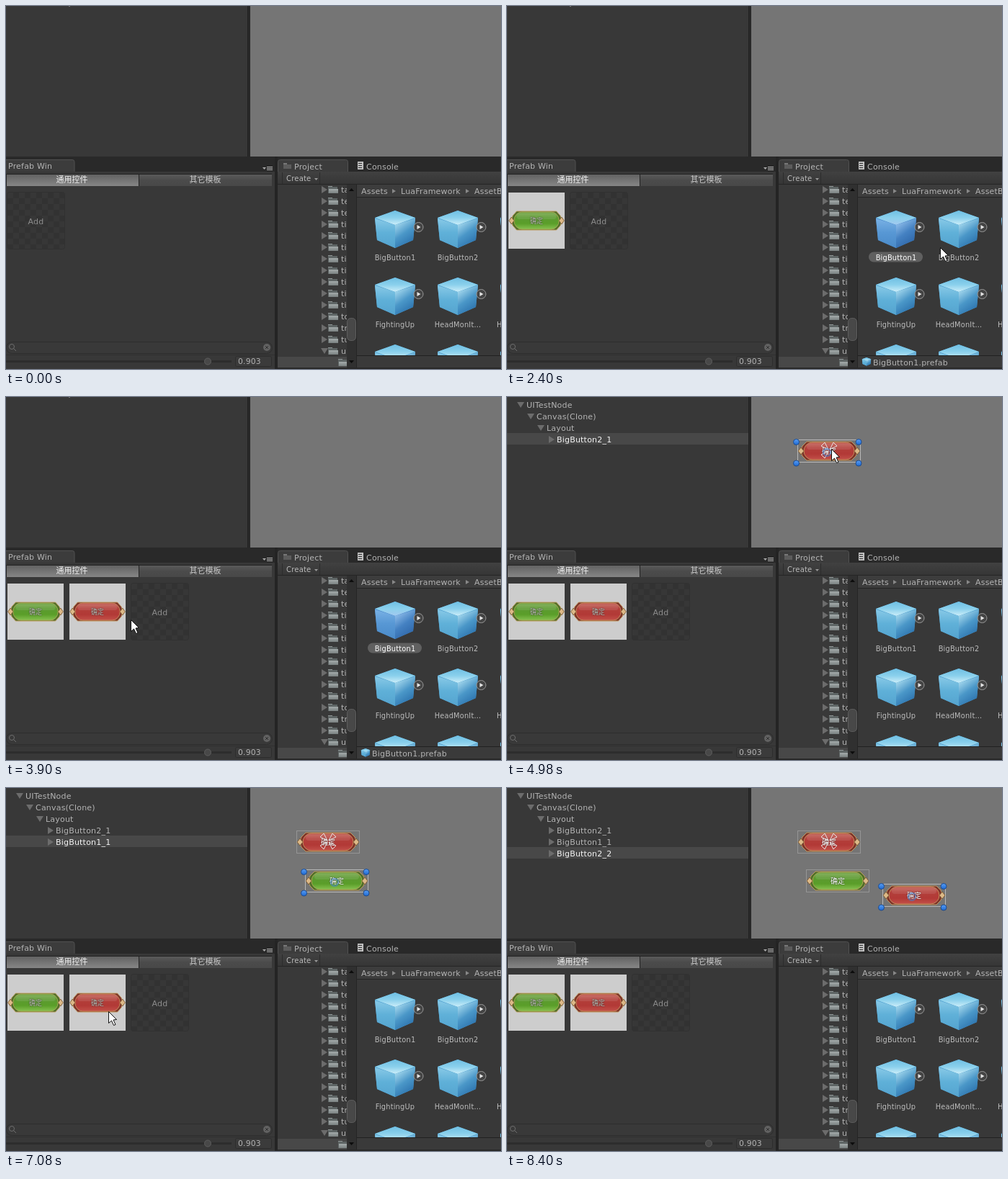
These frames come from a looping animation (687 px wide and 504 px high, 8.88 s). An HTML page with a canvas:

```html
<!DOCTYPE html>
<html lang="zh">
<head>
<meta charset="utf-8">
<style>
html, body { margin: 0; width: 100%; height: 100%; overflow: hidden; background: #292929; }
canvas { display: block; }
</style>
</head>
<body>
<canvas id="stage" width="687" height="504"></canvas>
<script>
const c = document.getElementById('stage').getContext('2d');
const LOOP = 8880, STEP = 60;
const SANS = '"DejaVu Sans", Verdana, sans-serif';
const CJK = '"Noto Sans CJK SC", "Noto Sans CJK", sans-serif';

// Pointer path: time, x, y
const path = [
  [60, 629, 170], [480, 534, 319], [1500, 534, 319], [1560, 497, 319],
  [1980, 44, 303], [2040, 44, 303], [2400, 601, 335], [2640, 630, 322],
  [2760, 630, 322], [3300, 276, 304], [3480, 238, 308], [3780, 238, 308],
  [3900, 173, 309], [4140, 121, 300], [4380, 121, 300], [4860, 450, 72],
  [5220, 450, 72], [5580, 20, 300], [5700, 12, 298], [6060, 383, 190],
  [6300, 470, 127], [6480, 470, 127], [7080, 142, 310], [7260, 142, 310],
  [8040, 563, 143], [8160, 563, 143], [8400, 690, 96]
];

function rect(x, y, w, h, fill) {
  c.fillStyle = fill;
  c.fillRect(x, y, w, h);
}
function line(x, y, w, h, color) {
  c.strokeStyle = color;
  c.lineWidth = 1;
  c.strokeRect(x + .5, y + .5, w - 1, h - 1);
}
function round(x, y, w, h, r, fill, stroke) {
  c.beginPath();
  c.roundRect(x, y, w, h, r);
  paint(fill, stroke);
}
function circle(x, y, r, fill, stroke) {
  c.beginPath();
  c.arc(x, y, r, 0, 7);
  paint(fill, stroke);
}
function poly(points, fill, stroke) {
  c.beginPath();
  for (let i = 0; i < points.length; i += 2) c.lineTo(points[i], points[i + 1]);
  c.closePath();
  paint(fill, stroke);
}
function paint(fill, stroke) {
  if (fill) { c.fillStyle = fill; c.fill(); }
  if (stroke) { c.strokeStyle = stroke; c.lineWidth = 1; c.stroke(); }
}
function grad(x0, y0, x1, y1, ...colors) {
  const g = c.createLinearGradient(x0, y0, x1, y1);
  colors.forEach((color, i) => g.addColorStop(i / (colors.length - 1), color));
  return g;
}
function text(str, x, y, color = '#b4b4b4', size = 11, align = 'left', family = SANS) {
  c.font = `${size}px ${family}`;
  c.letterSpacing = family === SANS ? '.2px' : '0px';
  c.textAlign = align;
  c.textBaseline = 'alphabetic';
  c.fillStyle = color;
  c.fillText(str, x, y + 4);
}
function clipped(x, y, w, h, draw) {
  c.save();
  c.beginPath();
  c.rect(x, y, w, h);
  c.clip();
  draw();
  c.restore();
}
function arrow(x, y, open, color = '#6c6c6c') {
  if (open) poly([x - 5, y - 4, x + 5, y - 4, x, y + 4], color);
  else poly([x - 4, y - 5, x + 4, y, x - 4, y + 5], color);
}
function folder(x, y) {
  rect(x, y - 5, 6, 3, '#8f9696');
  rect(x, y - 4, 13, 9, '#5e6565');
  rect(x + 1, y - 1, 13, 6, grad(0, y - 1, 0, y + 5, '#a4abab', '#7a8181'));
}

function cube(x, y, k, sel) {
  c.save();
  c.translate(x, y);
  c.scale(k, k);
  poly([0, 0, 28, 10, 28, 12, 25, 41, 0, 52, -25, 41, -28, 12, -28, 10], sel ? '#4284c6' : '#4c9dcd');
  poly([0, 0, 28, 10, 0, 20, -28, 10],
    grad(0, 0, 0, 20, '#6fbfe3', '#8ad0ec', sel ? '#a3c9f0' : '#cdeef9'));
  poly([-28, 11, 0, 20, 0, 52, -25, 41],
    sel ? grad(0, 12, 0, 50, '#78b0e4', '#5797d4', '#4c8cca') : grad(0, 12, 0, 50, '#86c8e6', '#5fb0d8', '#56a5d0'));
  poly([28, 11, 0, 20, 0, 52, 25, 41],
    sel ? grad(2, 18, 22, 46, '#8bbae8', '#4481c2', '#3068aa') : grad(2, 18, 22, 46, '#a2d6ec', '#4a97c8', '#2d73ae'));
  c.restore();
}

function asset(x, y, label, sel, pill) {
  cube(x, y, 1, sel);
  circle(x + 32.5, y + 23, 6.5, '#444', '#999');
  poly([x + 30.5, y + 20, x + 35.5, y + 23, x + 30.5, y + 26], '#e4e4e4');
  if (pill) round(x - 38, y + 57.5, 75, 14, 7, pill);
  text(label, x, y + 64.5, pill ? '#fff' : '#bcbcbc', 9.8, 'center');
}

function addCell(x) {
  round(x + .5, 258.5, 80, 79, 3, '#373737', '#313131');
  clipped(x + 1, 259, 79, 78, () => {
    for (let i = 0; i < 10; i++)
      for (let j = 0; j < 10; j++)
        if ((i + j) % 2) rect(x + 1 + i * 8, 259 + j * 8, 8, 8, '#323232');
  });
  text('Add', x + 40.5, 299, '#8e8e8e', 11, 'center');
}

function gameButton(x, y, red, kx = 1, ky = 1, label = '#fff') {
  c.save();
  c.translate(x, y);
  c.scale(kx, ky);
  const frame = [-40, 0, -37, -7, -31, -13, 31, -13, 37, -7, 40, 0, 37, 7, 31, 13, -31, 13, -37, 7];
  poly(frame, red ? '#7c322a' : '#4f6f2a', '#c09a5e');
  for (const s of [-1, 1])
    poly([s * 43, 0, s * 39, -5, s * 35, 0, s * 39, 5], '#dcb988', '#7d5c36');
  round(-35, -12, 70, 24, 12,
    red ? grad(0, -12, 0, 12, '#c4645b', '#b33f3a', '#b23936', '#c25049')
        : grad(0, -12, 0, 12, '#7aa94f', '#5c9a30', '#5a9e29', '#86c150'),
    red ? '#c58a58' : '#a9a552');
  round(-31, -10, 62, 8, 5, '#ffffff18');
  c.shadowColor = '#222';
  c.shadowBlur = 2;
  text('确定', 0, 0, label, 10, 'center', CJK);
  c.restore();
}

function thumb(x, red) {
  rect(x, 259, 78, 78, '#cdcdcd');
  gameButton(x + 39, 298, red, .89, 1, '#b4b4ac');
}

function sceneButton(x, y, red, sel, anchors) {
  gameButton(x, y, red);
  line(x - 44, y - 16, 88, 32, sel ? '#b8b8b8' : '#959595');
  if (anchors)
    for (const sx of [-1, 1])
      for (const sy of [-1, 1])
        poly([x + sx, y - 1 + sy, x + sx * 11, y - 1 + sy * 6, x + sx * 6, y - 1 + sy * 11], null, '#e4e4e4');
  if (!sel) return;
  c.beginPath();
  c.arc(x - 3, y + 2, 5, 0, 7);
  c.strokeStyle = '#3d7fd188';
  c.lineWidth = 2.5;
  c.stroke();
  for (const dx of [-45.5, 41])
    for (const dy of [-12.5, 17])
      circle(x + dx, y + dy, 4, grad(0, y + dy - 4, 0, y + dy + 4, '#5a9ff5', '#1c68d2'), '#1d4a8c');
}

function hierarchy(t) {
  if (t < 4920) { rect(87, 0, 2, 1, '#777'); return; }
  const sel = t < 6480 ? 3 : t < 8100 ? 4 : t < 8160 ? -1 : 5;
  const names = ['UITestNode', 'Canvas(Clone)', 'Layout', 'BigButton2_1'];
  if (t >= 6480) names.push('BigButton1_1');
  if (t >= 8160) names.push('BigButton2_2');
  names.forEach((name, i) => {
    const y = 11 + 16 * i, depth = Math.min(i, 3);
    if (i === sel) rect(0, y - 9, 335, 16, '#484848');
    arrow(19 + 14 * depth + (depth > 2 ? 1 : 0), y, depth < 3);
    text(name, 27 + 14 * depth, y, i === sel ? '#f4f4f4' : '#b4b4b4');
  });
}

function scene(t) {
  rect(339, 0, 348, 209, '#757575');
  if (t >= 4920) sceneButton(447, 75, true, t < 6480, true);
  if (t >= 6480) sceneButton(459, 129, false, t < 8100);
  if (t >= 8100) sceneButton(565, 149, true, true);
}

function prefabPanel(t) {
  round(-4, 213.5, 99, 24, 3, '#3c3c3c', '#515151');
  rect(0, 230, 374, 274, '#383838');
  text('Prefab Win', 3, 222);
  poly([356, 224, 361, 224, 358.5, 227], '#aaa');
  for (const y of [223, 225, 227]) rect(362, y, 8, 1, '#aaa');

  rect(0, 233, 369, 17, '#222');
  rect(1, 234, 183, 16, grad(0, 234, 0, 250, '#626262', '#747474', '#868686'));
  rect(185, 234, 184, 16, grad(0, 234, 0, 250, '#5a5a5a', '#4b4b4b', '#484848'));
  text('通用控件', 91.5, 241, '#f2f2f2', 11, 'center', CJK);
  text('其它模板', 276.5, 241, '#c8c8c8', 11, 'center', CJK);

  const count = (t >= 2040) + (t >= 3480);
  for (let i = 0; i < count; i++) thumb(2 + 86 * i, i === 1);
  addCell(1 + 86 * count);

  round(.5, 466.5, 369, 16, 8, '#393939', '#2d2d2d');
  circle(8, 473, 3.5, null, '#6e6e6e');
  poly([10.5, 475.5, 14, 479], null, '#6e6e6e');
  circle(362, 474, 5, '#626262');
  poly([360, 472, 364, 476], null, '#303030');
  poly([364, 472, 360, 476], null, '#303030');
  rect(0, 484, 374, 1, '#303030');
  rect(0, 492, 313, 3, '#2d2d2d');
  circle(280, 493.5, 4.5, '#484848', '#5e5e5e');
  round(318.5, 486.5, 50, 14, 2, '#3b3b3b', '#2d2d2d');
  text('0.903', 322, 493, '#b4b4b4', 10.8);
}

function tree() {
  rect(377, 248, 96, 254, '#393939');
  clipped(377, 248, 96, 254, () => {
    'ta te te ti ti ti ti ti ti ti ti to tr tu u'.split(' ').forEach((name, i) => {
      const y = 255 + 16 * i;
      arrow(442, y, name === 'u');
      folder(447, y);
      text(name, 465, y);
    });
    rect(377, 487, 96, 16, '#484848');
    folder(461, 495);
  });
  rect(473, 248, 13, 254, '#303030');
  poly([476, 257, 483, 257, 479.5, 253], '#0c0c0c');
  poly([476, 492, 483, 492, 479.5, 496], '#0c0c0c');
  round(473.5, 433.5, 12, 31, 5, '#484848', '#5e5e5e');
}

function projectPanel(t) {
  round(377.5, 213.5, 97, 24, 3, '#3c3c3c', '#515151');
  rect(377, 230, 310, 18, grad(0, 230, 0, 248, '#414141', '#353535'));
  rect(377, 247, 310, 1, '#252525');
  rect(385, 218, 5, 2, '#777');
  rect(385, 220, 11, 6, '#5c5c5c');
  text('Project', 400, 223);
  rect(488, 216, 8, 11, '#c0c0c0');
  for (const y of [218, 221, 224]) rect(489, y, 5, 1, '#333');
  text('Console', 500, 223);
  rect(383, 231, 1, 16, '#2c2c2c');
  rect(435, 231, 1, 16, '#2c2c2c');
  text('Create', 389, 239, '#bbb', 10);
  poly([428, 239, 433, 239, 430.5, 242], '#999');
  tree();

  rect(486, 248, 201, 254, '#383838');
  rect(487, 248, 200, 17, '#3d3d3d');
  rect(487, 265, 200, 1, '#252525');
  rect(486, 248, 1, 254, '#252525');
  text('Assets', 493, 257);
  text('LuaFramework', 548, 257);
  text('AssetBundle', 650, 257);
  for (const x of [538, 640]) poly([x - 2, 254, x + 3, 257, x - 2, 260], '#888');

  const picked = t >= 900 && t < 4920, second = t >= 2700 && t < 3240;
  const first = picked && !second;
  clipped(487, 266, 200, 219, () => {
    asset(540, 284, 'BigButton1', first, first && (t < 2040 ? '#3d6095' : '#606060'));
    asset(627, 284, 'BigButton2', second, second && '#3d6095');
    asset(540, 377, 'FightingUp');
    asset(627, 377, 'HeadMonIt...');
    for (const x of [540, 627, 714]) cube(x, 470, 1);
    cube(714, 284, 1);
    cube(714, 377, 1);
    text('H', 681, 441.5, '#bcbcbc', 9.8);
  });
  rect(487, 485, 200, 1, '#202020');
  rect(487, 486, 200, 16, '#3a3a3a');
  if (picked) {
    cube(499, 488, .22);
    text('BigButton1.prefab', 508, 495);
  }
  rect(377, 502, 310, 2, '#282828');
}

function pointer(t) {
  if (t < 60 || t >= 8400) return;
  const i = path.findIndex(p => p[0] > t);
  const [t0, x0, y0] = path[i - 1], [t1, x1, y1] = path[i];
  const u = (t - t0) / (t1 - t0), e = u * u * (3 - 2 * u);
  c.save();
  c.translate(Math.round(x0 + (x1 - x0) * e) + .5, Math.round(y0 + (y1 - y0) * e) + .5);
  poly([0, 0, 0, 16, 4, 12.5, 7, 19, 9.5, 18, 6.5, 11.5, 11, 11], '#fff', '#111');
  c.restore();
}

function draw() {
  const t = Math.floor(performance.now() % LOOP / STEP) * STEP;
  rect(0, 0, 687, 504, '#292929');
  rect(0, 0, 335, 209, '#383838');
  rect(335, 0, 1, 209, '#202020');
  hierarchy(t);
  scene(t);
  prefabPanel(t);
  rect(373, 209, 4, 295, '#242424');
  projectPanel(t);
  pointer(t);
  requestAnimationFrame(draw);
}
draw();
</script>
</body>
</html>
```
